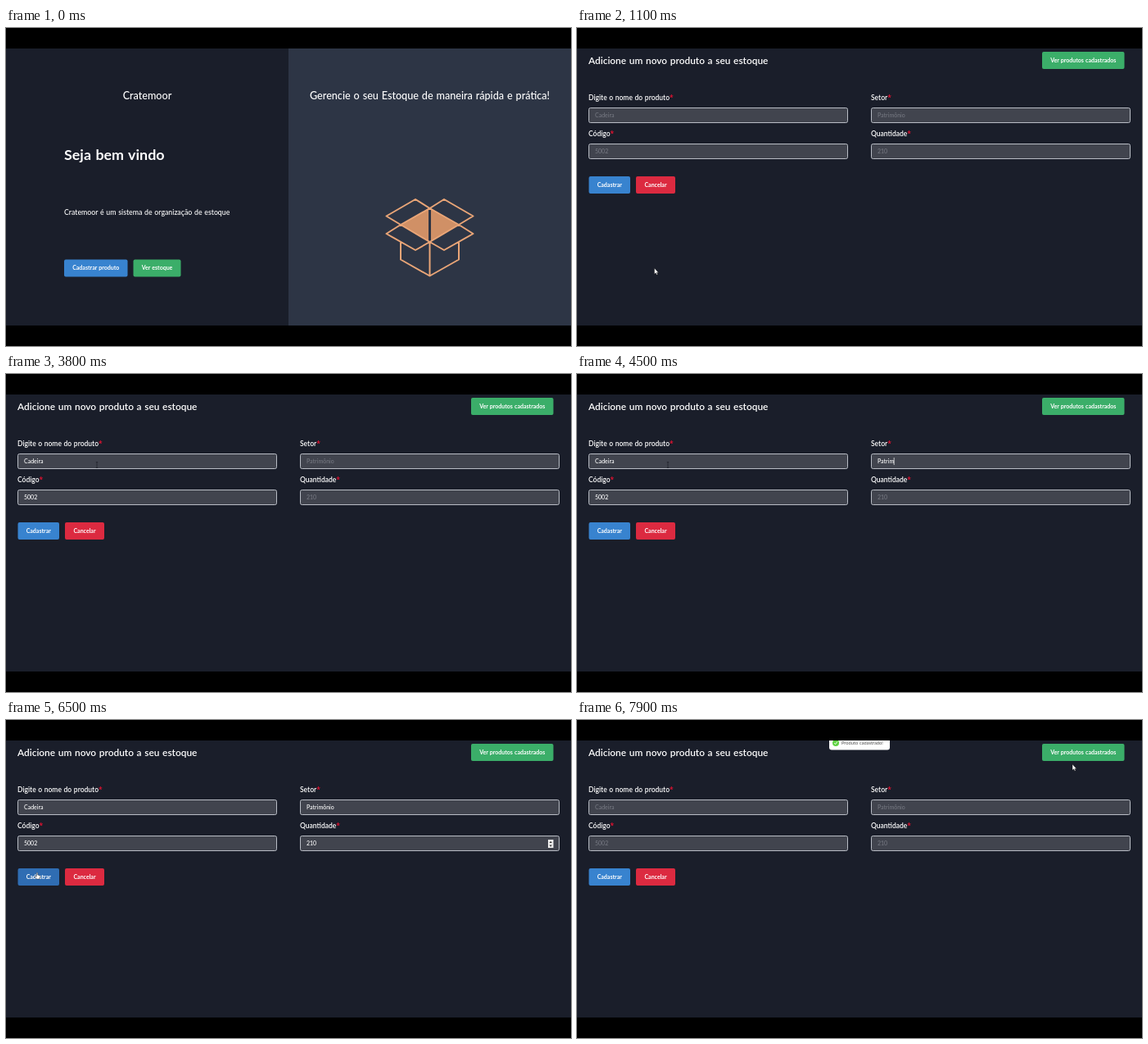
Write an HTML page that moves like this. It is 690 px wide and 388 px high and loops after 8000 ms.

```html
<!DOCTYPE html>
<html lang="pt-BR">
<head>
<meta charset="utf-8">
<title>Estoque</title>
<style>
  html, body { margin: 0; width: 100%; height: 100%; overflow: hidden; background: #000; }
  svg { display: block; width: 690px; height: 388px; }
  text { font-family: Lato, "Open Sans", sans-serif; fill: #fff; word-spacing: .06em; white-space: pre; }
  .head { font-size: 12.6px; font-weight: 500; text-anchor: middle; }
  .hello { font-size: 17.9px; font-weight: 700; }
  .about { font-size: 8.75px; font-weight: 500; }
  .title { font-size: 11.9px; font-weight: 600; }
  .label { font-size: 8.5px; font-weight: 600; }
  .label tspan { font-family: "Open Sans", sans-serif; fill: #f01030; }
  .btn { font-size: 7px; font-weight: 700; text-anchor: middle; }
  .value { font-size: 7px; font-weight: 500; }
  .value.hint { fill: #747780; }
  .toast { font-size: 5.7px; fill: #4b4b4b; }
  .box { fill: none; stroke: #e9a577; stroke-width: 2; stroke-linejoin: round; stroke-linecap: round; }
  .field { fill: #41444e; stroke: #b9bdc5; }
</style>
</head>
<body>
<svg viewBox="0 0 690 388">
  <rect width="690" height="388" fill="#000"/>

  <g id="home">
    <rect y="25" width="345" height="338" fill="#1a1e2a"/>
    <rect x="345" y="25" width="345" height="338" fill="#2d3545"/>
    <text class="head" x="172.5" y="87">Cratemoor</text>
    <text class="head" x="517.5" y="87">Gerencie o seu Estoque de maneira rápida e prática!</text>
    <text class="hello" x="71" y="161">Seja bem vindo</text>
    <text class="about" x="71" y="228">Cratemoor é um sistema de organização de estoque</text>
    <path fill="#d09066" d="M482 240L516 220V260ZM553 240L519 220V260Z"/>
    <path class="box" d="M517.5 220L500 209L464.500 229.500L482 240L464.500 251L500 271L517.5 261L535 271L570.500 251L553 240L570.500 229.500L535 209Z
      M517.5 220L482 240L517.5 261L553 240Z M482 262V282.500L517.5 302.500L553 282.500V262 M517.5 261V302.500"/>
    <path d="M517.5 222V259" stroke="#2d3545" stroke-width="2"/>
  </g>

  <g id="form">
    <rect y="25" width="690" height="338" fill="#1a1e2a"/>
    <text class="title" x="14" y="43.500">Adicione um novo produto a seu estoque</text>
    <g id="toast">
      <rect x="308" y="19" width="74" height="17.500" rx="3" fill="#fff"/>
      <circle cx="316" cy="28" r="4" fill="#61d345"/>
      <path d="M314.200 28.200l1.300 1.300l2.400-3" fill="none" stroke="#fff"/>
      <text class="toast" x="323" y="30.200">Produto cadastrado!</text>
    </g>
    <g id="spinner">
      <rect x="662" y="146" width="6.500" height="10" fill="#eee"/>
      <path d="M663.500 150l1.700-2.200l1.700 2.200zM663.500 152.500l1.700 2.200l1.700-2.200z" fill="#333"/>
    </g>
    <path id="caret" stroke="#fff" stroke-width=".7" d="M0 0V9"/>
  </g>

  <rect width="690" height="25" fill="#000"/>
  <rect y="363" width="690" height="25" fill="#000"/>

  <g id="cursor">
    <path id="arrow" d="M0 0V7.300L1.700 5.800L2.900 8.200L4 7.600L2.900 5.400H5Z" fill="#fff" stroke="#111" stroke-width=".4"/>
    <path id="hand" d="M-.7 -3.500Q0 -4.300 .7 -3.500V-1L3.200 -.3Q3.800 0 3.600 1L3 4H-.6L-2.800 1Q-2.600 .1 -1.700 .6L-.7 1.300Z" fill="#fff" stroke="#111" stroke-width=".4"/>
    <path id="beam" d="M-1.200 -3.500H1.200M0 -3.500V3.500M-1.200 3.500H1.200" fill="none" stroke="#1c1f27" stroke-width=".7"/>
  </g>
</svg>
<script>
const LOOP = 8000, TICK = 100, BLINK = 300;
const PAGE_AT = 1100, SENT_AT = 6900;
const BLUE = '#3883cf', BLUE_HOVER = '#2f6db3', BLUE_ACTIVE = '#2c5285';
const GREEN = '#3bae69', RED = '#dc2a40';
const $ = id => document.getElementById(id);

function add(parent, tag, attrs, text = '') {
  const el = document.createElementNS('http://www.w3.org/2000/svg', tag);
  for (const name in attrs) el.setAttribute(name, attrs[name]);
  el.textContent = text;
  parent.append(el);
  return el;
}

function button(page, x, y, width, fill, label) {
  const rect = add(page, 'rect', { x, y, width, height: 21, rx: 2, fill });
  add(page, 'text', { class: 'btn', x: x + width / 2, y: y + 12.8 }, label);
  return rect;
}

const openForm = button($('home'), 71, 282.5, 77.5, BLUE, 'Cadastrar produto');
button($('home'), 155.5, 282.5, 58, GREEN, 'Ver estoque');
button($('form'), 568, 29, 100.5, GREEN, 'Ver produtos cadastrados');
const save = button($('form'), 14.5, 181, 50.5, BLUE, 'Cadastrar');
button($('form'), 72, 181, 48, RED, 'Cancelar');

const keys = (start, count) => Array.from({ length: count }, (_, i) => start + i * TICK);

// focus: time the field is entered; keys: time of each typed character
const fields = [
  { x: 14, y: 97, label: 'Digite o nome do produto', value: 'Cadeira', focus: 1600, keys: keys(1800, 7) },
  { x: 14, y: 141, label: 'Código', value: '5002', focus: 2800, keys: keys(3000, 4) },
  { x: 359, y: 97, label: 'Setor', value: 'Patrimônio', focus: 3500, keys: [...keys(4000, 6), ...keys(4700, 4)] },
  { x: 359, y: 141, label: 'Quantidade', value: '210', focus: 5100, keys: [5700, 6000, 6100] }
];

for (const f of fields) {
  const label = add($('form'), 'text', { class: 'label', x: f.x, y: f.y - 9.5 }, f.label);
  add(label, 'tspan', {}, '*');
  add($('form'), 'rect', { class: 'field', x: f.x + .5, y: f.y + .5, width: 316, height: 18, rx: 2 });
  f.text = add($('form'), 'text', { x: f.x + 8, y: f.y + 12 });
}
$('form').append($('spinner'), $('caret'));

// time, x, y
const path = [
  [700, 150, 356], [900, 95, 296], [1000, 95, 296], [1100, 94.5, 293], [1200, 97, 260],
  [1400, 110, 125], [1500, 111, 111], [6200, 111, 111], [6500, 38, 190], [6800, 40, 198],
  [6900, 40.5, 203], [7000, 40.5, 203], [7200, 90, 223], [7400, 300, 205],
  [7600, 560, 140], [7700, 611, 111], [7800, 607, 70], [7900, 605, 54]
];

function place(t) {
  const next = path.findIndex(p => p[0] >= t);
  if (next < 1) return path[next < 0 ? path.length - 1 : 0].slice(1);
  const a = path[next - 1], b = path[next];
  const k = (t - a[0]) / (b[0] - a[0]);
  return [a[1] + (b[1] - a[1]) * k, a[2] + (b[2] - a[2]) * k];
}

const within = (t, from, to) => t >= from && t < to;
const show = (id, on) => $(id).setAttribute('display', on ? 'inline' : 'none');

function drawFields(t) {
  const sent = t >= SENT_AT;
  let active = null;
  for (const f of fields) {
    const count = sent ? 0 : f.keys.filter(k => k <= t).length;
    f.text.textContent = count ? f.value.slice(0, count) : f.value;
    f.text.setAttribute('class', count ? 'value' : 'value hint');
    if (t >= f.focus) active = { f, count };
  }
  if (!active || t >= 6700) return show('caret', false);
  const { f, count } = active;
  const last = count ? f.keys[count - 1] : f.focus;
  const width = count ? f.text.getComputedTextLength() : 0;
  $('caret').setAttribute('transform', `translate(${f.x + 8 + width} ${f.y + 5})`);
  show('caret', (t - last) % (2 * BLINK) < BLINK);
}

function draw(t) {
  show('home', t < PAGE_AT);
  show('form', t >= PAGE_AT);
  show('toast', t >= SENT_AT);
  show('spinner', within(t, 5100, 6700));
  openForm.setAttribute('fill', t >= 900 ? BLUE_HOVER : BLUE);
  save.setAttribute('fill', within(t, 6800, 7100) ? BLUE_ACTIVE : within(t, 6500, 7200) ? BLUE_HOVER : BLUE);
  if (t >= PAGE_AT) drawFields(t);

  const hand = within(t, 900, PAGE_AT) || within(t, 6500, SENT_AT);
  const beam = within(t, 1500, 6300);
  show('cursor', t >= 700);
  show('hand', hand);
  show('beam', beam);
  show('arrow', !hand && !beam);
  $('cursor').setAttribute('transform', `translate(${place(t)})`);
}

const start = performance.now();
function frame() {
  const t = (performance.now() - start) % LOOP;
  draw(Math.floor(t / TICK) * TICK);
  requestAnimationFrame(frame);
}
frame();
</script>
</body>
</html>
```
